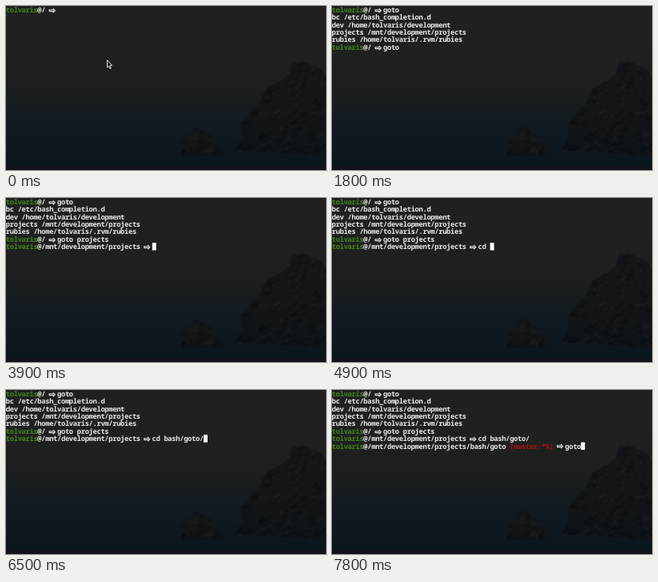
Write an HTML page with a canvas that moves like this. It is 400 px wide and 206 px high and loops after 8000 ms.

```html
<!DOCTYPE html>
<html lang="en">
<head>
<meta charset="utf-8">
<title>Terminal session</title>
<style>
  html, body { margin: 0; width: 100%; height: 100%; overflow: hidden; background: #1d201f; }
  canvas { display: block; width: 100vw; height: 100vh; }
</style>
</head>
<body>
<canvas id="stage" width="400" height="206"></canvas>
<script>
const W = 400, H = 206, LOOP = 8000;
const CELL = 4.94, LINE = 9.386, BASELINE = 7.8, BLINK = 500;
const WHITE = '#ebebe9', GREEN = '#46851b', RED = '#ae1010';
const TEXT_FONT = '600 8.8px "Noto Sans Mono", "DejaVu Sans Mono", monospace';
const ARROW_FONT = 'bold 10.5px "DejaVu Sans", sans-serif';
const ARROW = '\u21e8';
const USER = 'tolvaris';
const ctx = document.getElementById('stage').getContext('2d');
ctx.textRendering = 'geometricPrecision';

const prompt = (path, branch = '') => [
  [USER, GREEN], ['@' + path + ' ', WHITE], [branch, RED], [ARROW + ' ', WHITE]
];
const output = text => [[text, WHITE]];

const work = '/mnt/development/projects';
const rows = [
  { at: 0, parts: prompt('/') },
  { at: 1300, parts: output('bc /etc/bash_completion.d') },
  { at: 1300, parts: output(`dev /home/${USER}/development`) },
  { at: 1300, parts: output('projects ' + work) },
  { at: 1300, parts: output(`rubies /home/${USER}/.rvm/rubies`) },
  { at: 1300, parts: prompt('/') },
  { at: 3500, parts: prompt(work) },
  { at: 7000, parts: prompt(work + '/bash/goto', '(master:*%) ') }
];

// One key per character; a pace of 0 is a new prompt or a completion
const type = (row, at, text, pace = 0) =>
  (text ? [...text] : ['']).map((char, i) => ({ row, char, at: at + i * pace }));

const keys = [
  type(0, -700, ''),
  type(0, 400, 'goto ', 140),
  type(5, 1300, 'goto '),
  type(5, 2200, 'pr', 100),
  type(5, 2500, 'ojects '),
  type(6, 3500, ''),
  type(6, 4700, 'cd ', 100),
  type(6, 5100, 'bash/g', 140),
  type(6, 6300, 'o'),
  type(6, 6500, 'to/'),
  type(7, 7000, ''),
  type(7, 7700, 'goto', 30)
].flat();

function seeded(seed) {
  return () => (seed = (seed * 16807) % 2147483647) / 2147483647;
}

function verticalFade(c, y0, y1, colors) {
  const g = c.createLinearGradient(0, y0, 0, y1);
  colors.forEach((color, i) => g.addColorStop(i / (colors.length - 1), color));
  return g;
}

// Rough outline through a few corners, mottled with soft random patches
function rock(c, corners, top, bottom, patches, random) {
  const jitter = size => (random() - 0.5) * size;
  c.save();
  c.beginPath();
  corners.forEach(([x, y], i) => {
    const [nx, ny] = corners[(i + 1) % corners.length];
    const steps = Math.ceil(Math.hypot(nx - x, ny - y) / 5);
    for (let k = 0; k < steps; k++) {
      const f = k / steps;
      c.lineTo(x + (nx - x) * f + jitter(2), y + (ny - y) * f + jitter(2));
    }
  });
  c.closePath();
  c.fillStyle = verticalFade(c, top, bottom, ['#141719', '#131617', '#0d1216']);
  c.fill();
  c.clip();
  const left = Math.min(...corners.map(p => p[0]));
  const right = Math.max(...corners.map(p => p[0]));
  for (let i = 0; i < patches; i++) {
    c.fillStyle = random() < 0.5 ? 'rgba(48, 42, 36, 0.14)' : 'rgba(4, 8, 12, 0.2)';
    c.beginPath();
    c.ellipse(left + random() * (right - left), top + random() * (bottom - top),
      1 + random() * 5, 0.8 + random() * 2.5, -random(), 0, 2 * Math.PI);
    c.fill();
  }
  c.restore();
}

function makeBackdrop() {
  const layer = document.createElement('canvas');
  layer.width = W;
  layer.height = H;
  const c = layer.getContext('2d');
  const random = seeded(71);
  const horizon = 122;
  c.fillStyle = verticalFade(c, 0, horizon, ['#1f2120', '#1f2120', '#1e201f', '#191d1e']);
  c.fillRect(0, 0, W, horizon);
  c.fillStyle = verticalFade(c, horizon, 202, ['#171c1f', '#111a20', '#0e181e', '#0b151c']);
  c.fillRect(0, horizon, W, 80);

  rock(c, [[358, 70], [373, 70], [395, 80], [402, 92], [402, 188], [285, 181],
    [297, 165], [293, 148], [318, 120], [324, 105], [355, 87]], 68, 188, 260, random);
  rock(c, [[220, 188], [219, 168], [240, 150], [267, 173], [271, 186]], 149, 190, 50, random);

  c.fillStyle = '#15131a';
  c.fillRect(0, 202, W, 4);
  return layer;
}

function drawText(text, color, col, row) {
  const y = row * LINE + BASELINE;
  ctx.fillStyle = ctx.strokeStyle = color;
  for (const ch of text) {
    const x = col++ * CELL;
    if (ch === ARROW) {
      ctx.font = ARROW_FONT;
      ctx.lineWidth = 0.35;
      ctx.fillText(ch, x - 0.8, y + 0.8);
      ctx.strokeText(ch, x - 0.8, y + 0.8);
    } else if (ch !== ' ') {
      ctx.font = TEXT_FONT;
      ctx.fillText(ch, x - 0.17, y);
    }
  }
  return col;
}

function drawPointer() {
  ctx.beginPath();
  [[126.5, 68], [126.5, 77.2], [128.4, 75.4], [130, 78.8], [131.4, 78.1], [129.9, 74.8], [132.6, 74.5]]
    .forEach(([x, y]) => ctx.lineTo(x, y));
  ctx.closePath();
  ctx.fillStyle = '#161616';
  ctx.fill();
  ctx.strokeStyle = '#e8e8e8';
  ctx.lineWidth = 1;
  ctx.stroke();
}

const backdrop = makeBackdrop();

function draw(t) {
  ctx.drawImage(backdrop, 0, 0);
  const pressed = keys.filter(key => key.at <= t);
  const last = pressed[pressed.length - 1];

  rows.forEach(({ at, parts }, row) => {
    if (t < at) return;
    let col = 0;
    for (const [text, color] of parts) col = drawText(text, color, col, row);
    const typed = pressed.filter(key => key.row === row).map(key => key.char).join('');
    col = drawText(typed, WHITE, col, row);
    if (row === last.row && (t - last.at) % (2 * BLINK) < BLINK) {
      ctx.fillStyle = '#ffffff';
      ctx.fillRect(col * CELL, row * LINE, CELL, LINE);
    }
  });

  if (t < 400) drawPointer();
}

const start = performance.now();
function tick() {
  draw((performance.now() - start) % LOOP);
  requestAnimationFrame(tick);
}
tick();
</script>
</body>
</html>
```
